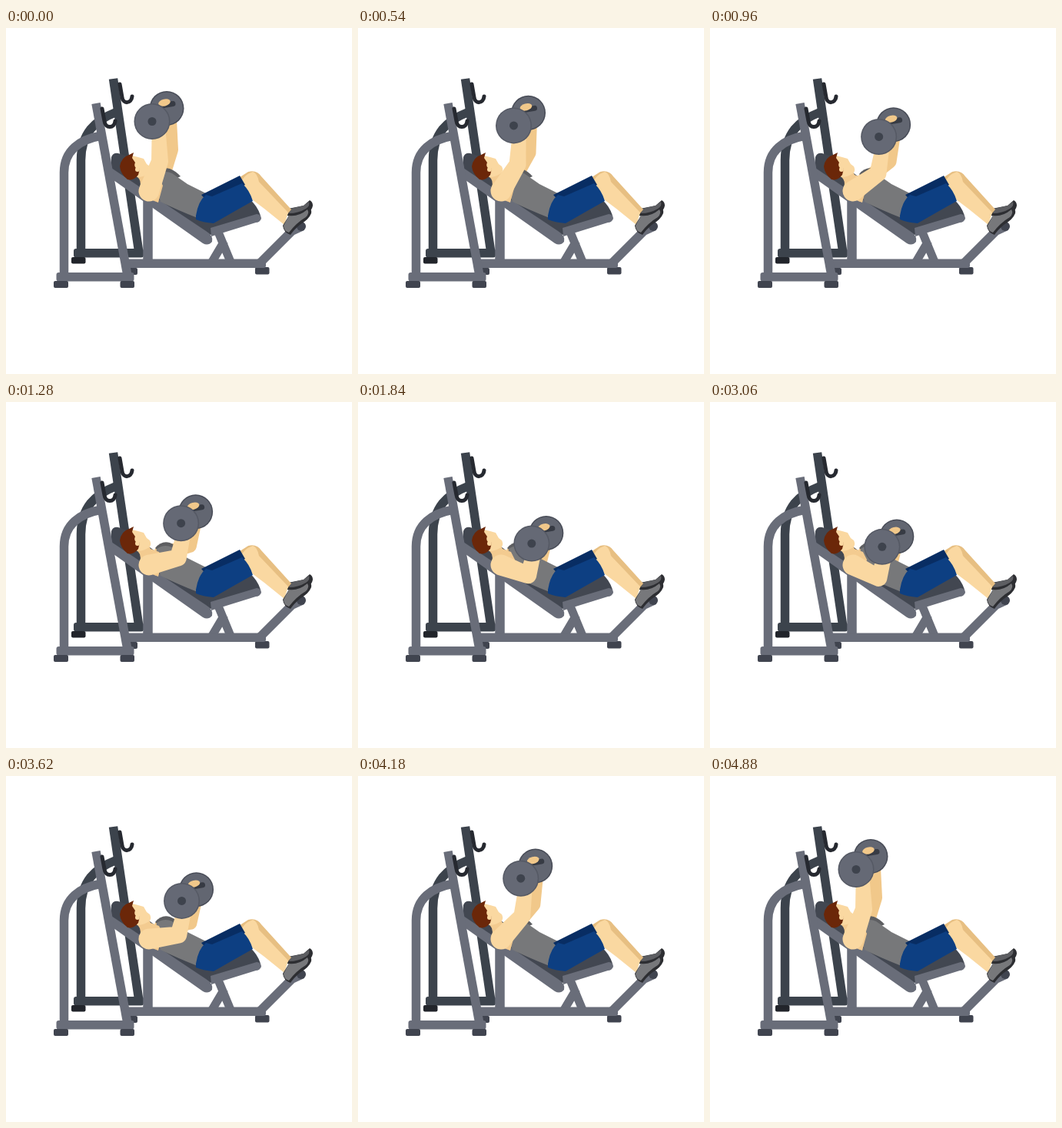
Animation, 450 px wide and 450 px high, one loop 5.96 s. Source, as an HTML page:

```html
<!DOCTYPE html>
<html lang="en">
<head>
<meta charset="utf-8">
<title>Incline dumbbell press</title>
<style>
html, body { margin: 0; width: 100%; height: 100%; overflow: hidden; background: #fff; }
svg { display: block; width: 100vw; height: 100vh; }
.line { fill: none; stroke-width: 11.5; }
.hook { fill: none; stroke: #262930; stroke-width: 5; stroke-linecap: round; }
.foot { fill: #40444f; }
</style>
</head>
<body>
<svg viewBox="0 0 450 450">
  <!-- rack, far side -->
  <g class="line" stroke="#3c434c">
    <path d="M97.500 293V172C97.500 137 116 120 142 110"/>
    <path d="M139.500 66L173.500 296"/>
  </g>
  <rect x="88" y="287" width="91" height="11.500" rx="3" fill="#3c434c"/>
  <rect x="85" y="298" width="18.500" height="8.500" rx="2" fill="#22252b"/>
  <path class="hook" d="M148 73L151 90C152 99 163 99 164 89"/>

  <!-- bench -->
  <rect class="foot" x="154" y="312" width="17" height="9" rx="2"/>
  <rect class="foot" x="324" y="311" width="18.500" height="9.500" rx="2"/>
  <g class="line" stroke="#696d79">
    <path d="M184.500 222V304" stroke-width="12.500"/>
    <path d="M273 258L292 304M284 277L268 304" stroke-width="11"/>
    <path d="M331 305L372 264L385 258" stroke-linejoin="round"/>
  </g>
  <rect x="157" y="300.500" width="181" height="11.500" rx="3" fill="#696d79"/>
  <circle cx="384" cy="258" r="6" fill="#40444f"/>
  <path d="M137 168Q139 162 146 163L158 167L273 254L268 269L258 268L141 194Q135 190 136 183Z" fill="#424751"/>
  <path d="M137 182L260 264Q270 270 268 278Q263 284 256 280L140 198Q134 193 137 182Z" fill="#696d79"/>
  <path d="M254 256L316 222Q327 231 331 244L270 264Z" fill="#424751"/>
  <path d="M266 260L326 242Q332 242 332 248Q330 253 325 253L267 271Z" fill="#696d79"/>

  <!-- rack, near side -->
  <g class="line" stroke="#696d79">
    <path d="M75.500 324V188C75.500 159 96 145 124 140"/>
    <path d="M117 98L158 322"/>
  </g>
  <rect x="65.500" y="318" width="101" height="11.500" rx="3" fill="#696d79"/>
  <rect class="foot" x="62" y="329" width="19" height="9" rx="2"/>
  <rect class="foot" x="148.500" y="329" width="18.500" height="9" rx="2"/>
  <path class="hook" d="M125 105L128 121C129 131 141 131 142 121"/>

  <!-- far dumbbell and arm -->
  <path id="farArm" fill="#f1c88a"/>
  <g id="farPlate">
    <circle r="22.500" fill="#484c57"/>
    <circle r="21" fill="#626671"/>
    <path d="M-4 -4L8 -6" stroke="#373b44" stroke-width="7" stroke-linecap="round"/>
    <ellipse cx="-1" cy="-8" rx="8" ry="4.500" transform="rotate(-15)" fill="#f1c88a"/>
  </g>

  <!-- legs and shoes -->
  <path d="M366 244L367 235L387 231L395 224Q399 226 399 231Q398 238 390 242L376 247Z" fill="#2d2e32"/>
  <path d="M368 241L370 235L387 231L394 226Q396 231 390 235Q380 241 368 241Z" fill="#5d5e62"/>
  <path d="M301 196L315 187Q326 184 332 193L371 236L363 246L320 207Z" fill="#e7bf82"/>
  <path d="M304 203Q309 191 321 187Q327 189 329 200L367 240L362 256L336 235L320 223Z" fill="#fad8a1"/>
  <path d="M360 257L368 244Q380 246 394 234Q398 236 397 241Q394 249 382 256Q374 263 370 269Q361 266 360 257Z" fill="#2d2e32"/>
  <path d="M361 257L368 244Q380 246 392 236Q395 241 390 246Q378 253 368 266Q361 264 361 257Z" fill="#77787b"/>

  <!-- trunk -->
  <path d="M194 190Q202 180 213 183Q221 186 227 193L207 202Z" fill="#5d5e61"/>
  <path d="M196 191Q206 184 216 189L236 203L260 215L249 247Q221 236 201 226Q193 209 196 191Z" fill="#77787a"/>
  <path d="M254 217L304 192L311 204L264 228Z" fill="#082d63"/>
  <path d="M247 244Q250 225 260 217L268 219L307 202Q317 211 321 225Q296 239 270 254Q256 253 247 249Z" fill="#0d3f82"/>

  <!-- head -->
  <path d="M165 184L184 183L188 191L199 195L204 205L198 227Q181 222 174 208Q177 198 170 193Z" fill="#f3cb90"/>
  <path d="M164 166L172 168L179 170L183 177L187 180Q190 186 186 189Q179 194 171 194L160 185Z" fill="#fad8a1"/>
  <path d="M148 180Q150 168 160 165L166 162L164 169L168 175Q166 179 169 182L174 183L172 191Q166 199 158 197Q149 190 148 180Z" fill="#6b2709"/>
  <circle cx="171" cy="184" r="3" fill="#fad8a1"/>

  <!-- near arm and dumbbell -->
  <path id="nearArm" fill="#fad8a1"/>
  <g id="nearPlate">
    <circle r="23.500" fill="#555964"/>
    <circle r="22" fill="#656975"/>
    <circle r="5.500" fill="#3e434d"/>
  </g>
</svg>
<script>
const LOOP = 5960, DOWN = 2500, UP = 2580, END = 4880;
const $ = id => document.getElementById(id);
const ease = x => (1 - Math.cos(Math.PI * Math.min(1, Math.max(0, x)))) / 2;

function polar([x, y], length, degrees) {
  const a = degrees * Math.PI / 180;
  return [x + length * Math.cos(a), y + length * Math.sin(a)];
}

// Tapered segment with round ends.
function limb(a, ra, b, rb) {
  const angle = Math.atan2(b[1] - a[1], b[0] - a[0]) * 180 / Math.PI;
  const a1 = polar(a, ra, angle - 90), a2 = polar(a, ra, angle + 90);
  const b1 = polar(b, rb, angle - 90), b2 = polar(b, rb, angle + 90);
  return `M${a1}L${b1}A${rb} ${rb} 0 0 1 ${b2}L${a2}A${ra} ${ra} 0 0 1 ${a1}Z`;
}

// Both segments foreshorten slightly as the arm folds (p: 0 = raised, 1 = lowered).
function arm(id, shoulder, p, [top, joint, wrist]) {
  const elbow = polar(shoulder, 41 - 4 * p, -70 + 108 * p);
  const hand = polar(elbow, 58 - 11 * p, -75 - 17 * (1 - p) ** 3);
  $(id).setAttribute("d", limb(shoulder, top, elbow, joint) + limb(elbow, joint, hand, wrist));
  return hand;
}

function place(id, x, y) {
  $(id).setAttribute("transform", `translate(${x} ${y})`);
}

function draw(now) {
  const t = now % LOOP;
  const p = t < UP ? ease(t / DOWN) : 1 - ease((t - UP) / (END - UP));
  const [x, y] = arm("nearArm", [186, 212], p, [13.5, 11, 8]);
  arm("farArm", [202, 197], p, [10, 8, 7]);
  place("nearPlate", x - 8, y + 6);
  place("farPlate", x + 11, y - 11 + 4 * p);
  requestAnimationFrame(() => draw(performance.now() - start));
}

const start = performance.now();
draw(0);
</script>
</body>
</html>
```
